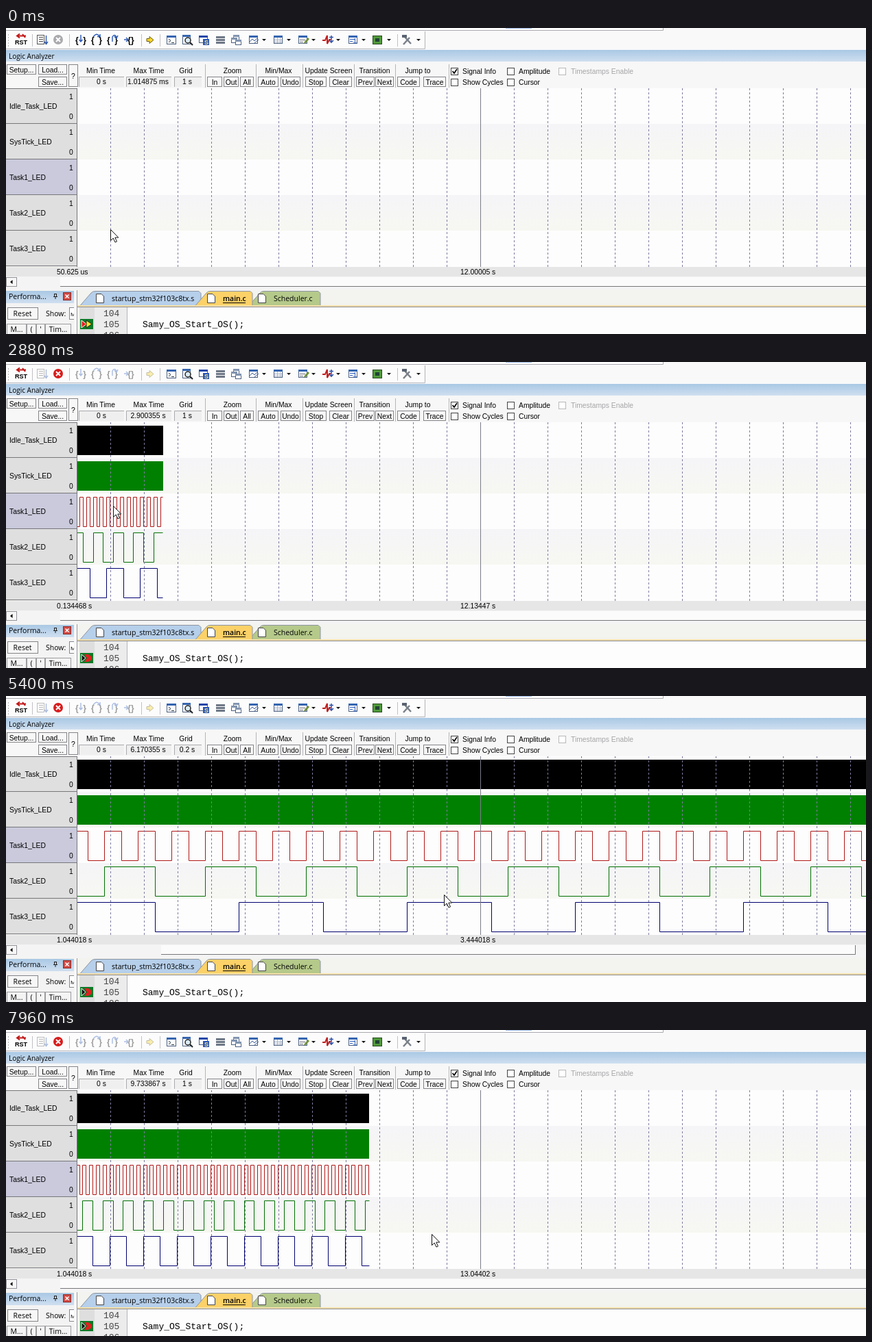
An HTML page for the animation above (8 s loop, 1253 by 447 pixels).

```html
<!DOCTYPE html>
<html lang="en">
<head>
<meta charset="utf-8">
<title>Logic Analyzer</title>
<style>
html, body { margin: 0; width: 100%; height: 100%; overflow: hidden; background: #f7f7f7; }
svg { display: block; width: 1253px; height: 447px; }
text { font: 10.35px "Liberation Sans", Arial, sans-serif; white-space: pre; }
.ui { font: 10.5px "Open Sans", "Noto Sans", sans-serif; }
.code { font: 13px "Liberation Mono", "Courier New", monospace; }
.bold { font-weight: 600; }
</style>
</head>
<body>
<svg id="stage" viewBox="0 0 1253 447">
  <defs>
    <linearGradient id="title" x2="0" y2="1"><stop stop-color="#a9c8e4"/><stop offset="1" stop-color="#cfdff0"/></linearGradient>
    <linearGradient id="band" x2="0" y2="1"><stop stop-color="#f5f5f8"/><stop offset="1" stop-color="#f7f7f2"/></linearGradient>
    <clipPath id="plot"><rect x="104" y="88" width="1149" height="261"/></clipPath>
  </defs>
</svg>
<script>
const NS = 'http://www.w3.org/2000/svg';
const stage = document.getElementById('stage');
let layer = stage;

function add(tag, attrs = {}, text) {
  const el = document.createElementNS(NS, tag);
  set(el, attrs);
  if (text !== undefined) el.textContent = text;
  layer.append(el);
  return el;
}
function set(el, attrs) {
  for (const k in attrs) el.setAttribute(k, attrs[k]);
}
function group(draw, attrs = {}) {
  const outer = layer, g = add('g', attrs);
  layer = g;
  draw();
  layer = outer;
  return g;
}
const rect = (x, y, width, height, fill, more) => add('rect', { x, y, width, height, fill, ...more });
const box = (x, y, w, h, fill, stroke) => rect(x + .5, y + .5, w - 1, h - 1, fill, { stroke });
const text = (s, x, y, more) => add('text', { x, y, ...more }, s);
const mid = (s, x, y, more) => text(s, x, y, { 'text-anchor': 'middle', ...more });
const line = (d, stroke, more) => add('path', { d, stroke, fill: 'none', ...more });
const shape = (d, fill, more) => add('path', { d, fill, ...more });
const show = (el, on) => el.setAttribute('visibility', on ? 'visible' : 'hidden');

// Toolbar
rect(0, 0, 1253, 32, '#f9f9fa');
rect(0, 0, 957, 3, '#fff');
line('M0 3.5H957.5V0', '#a9a9b0');
rect(728, 0, 38, 1, '#9cbbe8');
rect(0, 5, 610, 26, '#fcfcfc');
line('M0 30.5H610.5V5', '#b4b4ba');
for (const x of [38, 92, 197, 224, 570]) line(`M${x}.5 9V27`, '#c2c2c6');

line('M3.5 9V27', '#b4b4ba', { 'stroke-dasharray': '2 2' });
text('RST', 13, 24, { style: 'font-size:9px;font-weight:bold' });
line('M29 11.500H17M20 8.500L16 11.500L20 14.500M24 9L28 14', '#c01818', { 'stroke-width': 2 });

const hover = rect(41.5, 6.5, 22, 22, '#d8e8fb', { stroke: '#a8c8ee' });
const runTools = group(() => {
  box(45, 10, 11, 14, '#fff', '#555');
  line('M48 13.5H54M48 16.5H54M48 19.5H54', '#444');
  line('M58.5 11V23M56 20L58.5 23.5L61 20', '#2858b8', { 'stroke-width': 1.4 });
  // Braces with a step arrow in, over, out of and up to them
  [109, 132, 155, 180].forEach((x, i) => {
    mid(i < 3 ? '{  }' : '{}', x + (i === 3 ? 2 : 0), 22, { style: 'font-size:12px;font-weight:bold' });
    line(['M109 10V20M106.500 17L109 20L111.500 17',
      'M127 13Q132 6 136 12M133 12.500H137V9',
      'M155 20V13Q158 8 161 13M158 12L161 15L163 11',
      'M172 17H178M175 14L178 17L175 20'][i], '#2858b8', { 'stroke-width': 1.4 });
  });
  shape('M205 15.500H209V12.500L215 17.500L209 22.500V19.500H205Z', '#f6d62c', { stroke: '#6b5a10' });
});
const stopDisc = add('circle', { cx: 76, cy: 17, r: 7 });
line('M73 14L79 20M79 14L73 20', '#fff', { 'stroke-width': 2 });

function windowIcon(x, y, w, h, bar = '#3565b0') {
  box(x, y, w, h, '#fff', '#4b5f80');
  rect(x, y, w, 3, bar);
}
windowIcon(234, 11, 14, 13);
line('M237 16L240 18.500L237 21M241 21.500H245', '#234');
windowIcon(257, 10, 12, 14);
add('circle', { cx: 265, cy: 18, r: 4, fill: '#d8eaff', stroke: '#222', 'stroke-width': 1.5 });
line('M268 21L272 25', '#222', { 'stroke-width': 2 });
windowIcon(281, 11, 13, 11, '#1d46a8');
rect(287, 16, 9, 9, '#2b57b8');
text('S', 289, 24, { fill: '#ffe46a', style: 'font-size:9px;font-weight:bold' });
for (const y of [12, 16, 20]) rect(306, y, 13, 3, '#6d7786');
for (const [x, y] of [[331, 10], [328, 14], [334, 17]]) windowIcon(x, y, 9, 8, '#8294b0');
for (const x of [354, 390, 426, 499]) windowIcon(x, 11, 13, 12);
line('M355 20L359 16L362 19L366 15M362 22L368 17', '#37588f');
line('M391 17.500H402M391 20.500H402M395.500 14V22M399.500 14V22', '#aab4c6');
line('M428 17.500H436M428 20.500H433', '#667');
shape('M434 21L440 14L442 16L436 23Z', '#72913a');
line('M461 18H465L468 11V23L471 17H473', '#c02222', { 'stroke-width': 2 });
line('M471 13.500H477M474 11V21M471 18L474 21L477 18', '#3454a8', { 'stroke-width': 1.6 });
line('M501 16.500H509M501 19.500H505M508.500 15V23M506 20.500L508.500 23L511 20.500', '#2858b8');
box(534, 11, 14, 13, '#4f9a3a', '#244c1c');
rect(538, 15, 6, 5, '#243');
line('M579 24L588 14M580 12L590 23', '#7a8088', { 'stroke-width': 2.5 });
rect(577, 10, 7, 4, '#596270');
for (const x of [376, 412, 448, 484, 521, 558, 601]) shape(`M${x - 3} 16H${x + 3}L${x} 19Z`, '#111');

// Analyzer title and controls
rect(0, 32, 1253, 17, 'url(#title)');
text('Logic Analyzer', 4, 45, { class: 'ui', style: 'font-size:10px' });
rect(0, 49, 1253, 39, '#f7f7f7');
function button(s, x, y, w, h = 15) {
  box(x, y, w, h, '#f7f7f7', '#85858a');
  mid(s, x + w / 2, y + h / 2 + 4);
}
button('Setup...', 1, 53, 43);
button('Load...', 47, 53, 42);
button('Save...', 47, 71, 42);
button('?', 91, 53, 14, 33);
for (const x of [290, 364, 432, 507, 567, 645]) line(`M${x}.5 53V87`, '#b5b5b9');
[['Min Time', 138], ['Max Time', 208], ['Grid', 262], ['Zoom', 330], ['Min/Max', 397],
 ['Update Screen', 470], ['Transition', 537], ['Jump to', 600]].forEach(([s, x]) => mid(s, x, 66));
for (const [x, w] of [[106, 66], [175, 66], [245, 40]]) {
  rect(x, 71, w, 15, '#efefef');
  line(`M${x}.5 86V71.500H${x + w}`, '#aaaaae');
}
mid('0 s', 139, 82);
const maxText = mid('', 207, 82), gridText = mid('', 264, 82);
[['In', 293, 22], ['Out', 317, 22], ['All', 341, 20], ['Auto', 367, 30], ['Undo', 400, 29],
 ['Stop', 436, 31], ['Clear', 471, 33], ['Prev', 510, 27], ['Next', 538, 27],
 ['Code', 570, 33], ['Trace', 608, 33]].forEach(([s, x, w]) => button(s, x, 71, w));
[['Signal Info', 648, 58], ['Show Cycles', 648, 74], ['Amplitude', 730, 58],
 ['Cursor', 730, 74], ['Timestamps Enable', 805, 58]].forEach(([s, x, y]) => {
  const off = x === 805;
  box(x, y, 11, 11, '#fff', off ? '#b9b9b9' : '#444');
  text(s, x + (off ? 18 : 17), y + 9, { fill: off ? '#a5a5a8' : '#000' });
});
line('M650.500 63L653 66L657 60', '#000', { 'stroke-width': 1.7 });

// Signal rows
rect(104, 88, 1149, 261, '#fdfdfd');
['Idle_Task_LED', 'SysTick_LED', 'Task1_LED', 'Task2_LED', 'Task3_LED'].forEach((s, i) => {
  const y = 88 + 52 * i;
  if (i % 2) rect(104, y, 1149, 52, 'url(#band)');
  rect(0, y, 103, 52, i === 2 ? '#cacadc' : '#dfdfdf');
  line(`M0 ${y + 51.5}H103`, '#77777c');
  text(s, 5, y + 30);
  text('1', 92, y + 15.5);
  text('0', 92, y + 44.5);
});
line('M103.500 88V349M0 88.500H103', '#77777c');

const waves = group(() => {}, { 'clip-path': 'url(#plot)' });
layer = waves;
const idle = rect(104, 93, 0, 43, '#000');
const sysTick = rect(104, 145, 0, 43, '#008000');
const tasks = [
  { half: .1, top: 197.5, color: '#b01818' },
  { half: .3, top: 249.5, color: '#007000' },
  { half: .5, top: 301.5, color: '#000070' }
];
for (const k of tasks) k.path = line('', k.color);
layer = stage;
for (let x = 152.5; x < 1253; x += 49) {
  if (x !== 691.5) line(`M${x} 88V349`, '#7c7ca0', { 'stroke-dasharray': '3 3' });
}
line('M691.500 88V349', '#7c7c88');

// Time axis and scrollbar
rect(0, 349, 1253, 14, '#e6e6e6');
const leftText = text('', 74, 360), rightText = text('', 662, 360);
rect(0, 363, 1253, 16, '#f4f4f4');
box(0, 364, 16, 14, '#f7f7f7', '#929298');
shape('M9.500 368V374L6 371Z', '#000');
const thumb = rect(79, 364, 1180, 13, '#fbfbfb');
const thumbEdge = line('', '#77777c');

// Lower docks
rect(0, 379, 1253, 68, '#f3f3ef');
rect(0, 379, 1253, 4, '#f4f4f4');
rect(0, 384, 99, 18, 'url(#title)');
text('Performa...', 4, 396, { class: 'ui' });
line('M69 392.500H75M70.500 388V392M73.500 388V392M70 388.500H74M72 393V396', '#222');
box(83, 386, 12, 12, '#d24a44', '#8c2a28');
line('M86.500 389.500L91.500 394.500M91.500 389.500L86.500 394.500', '#fff', { 'stroke-width': 1.5 });
rect(0, 402, 99, 45, '#f3f3f3');
box(2, 408, 45, 18, '#f7f7f7', '#85858a');
mid('Reset', 24, 420.5, { class: 'ui' });
text('Show:', 58, 420.5, { class: 'ui' });
box(92, 408, 9, 18, '#fff', '#85858a');
text('M', 94, 420.5, { class: 'ui', style: 'font-size:8px' });
[[1, 29, 'M...'], [30, 14, '('], [44, 13, "'"], [57, 38, 'Tim...']].forEach(([x, w, s]) => {
  box(x, 432, w, 18, '#f4f4f4', '#9c9ca0');
  mid(s, x + w / 2, 444, { class: 'ui' });
});
rect(99, 383, 5, 64, '#f7f7f7');
line('M103.500 383V447', '#9a9aa0');

function tab(x, w, fill, s, tx, cls) {
  shape(`M${x} 405.500L${x + 16} 387Q${x + 18} 384.500 ${x + 22} 384.500H${x + w - 3}L${x + w} 387.500V405.500Z`, fill, { stroke: '#8c94a2' });
  const ix = tx - 23;
  shape(`M${ix + .5} 388.500H${ix + 8}L${ix + 11.5} 392V401.500H${ix + .5}Z`, '#fff', { stroke: '#444' });
  text(s, tx, 399, { class: cls });
}
tab(108, 176, '#b6cfea', 'startup_stm32f103c8tx.s', 154, 'ui');
tab(354, 104, '#b5c98a', 'Scheduler.c', 390, 'ui');
tab(276, 83, '#fbd168', 'main.c', 316, 'ui bold');
line('M316 401.500H349', '#000');
rect(104, 405, 1149, 2, '#f3dfa8');
line('M104 407.500H1253', '#8d8d92');
rect(107, 408, 1146, 39, '#fdfdfd');
rect(107, 408, 22, 39, '#dedede');
rect(129, 408, 48, 39, '#ececec');
line('M176.500 408V447', '#b4b4b8');
['104', '105', '106'].forEach((s, i) => text(s, 142, 421 + 16 * i, { class: 'code', fill: '#444' }));
text('Samy_OS_Start_OS();', 199, 437, { class: 'code' });
rect(108, 425, 19, 15, '#0c7a28');
const paused = group(() => {
  shape('M110 427L117 432.500L110 438Z', '#e02020', { stroke: '#fff' });
  shape('M117 427L125 432.500L117 438Z', '#ffe526', { stroke: '#222' });
});
const running = group(() => {
  shape('M110 427L116 432.500L110 438Z', '#111', { stroke: '#fff' });
  shape('M114 427H119Q124 428 125 432.500Q124 437 119 438H114L118 432.500Z', '#e02020');
});

// Tooltip
let tipCells;
const tip = group(() => {
  box(0, 0, 344, 71, '#fefefe', '#77777c');
  const cell = (s, x, y) => text(s, x, y, { class: 'ui', fill: '#55555a' });
  const title = cell('', 5, 14);
  cell('Mouse Pos', 108, 27);
  cell('Reference Point', 210, 27);
  cell('Delta', 312, 27);
  const values = ['Time:', 'Value:', 'PC $:'].map((s, i) => {
    const y = 40 + 12.5 * i;
    cell(s, 5, y);
    cell('N/A', 210, y);
    if (i < 2) cell('N/A', 312, y);
    return cell('', 108, y);
  });
  tipCells = [title, ...values];
});
const tips = [
  { from: 3520, to: 4240, x: 155, y: 230, cells: ['Task1_LED', '1.256018 s', '1', '0x8000c44'] },
  { from: 6080, to: 6640, x: 769, y: 268, cells: ['Task2_LED', '3.760018 s', '1', '0x8000c68'] }
];

const pointer = shape('M0 0V16L3.700 12.500L6.500 18.500L9 17.400L6.300 11.600H11.300Z', '#fff', { stroke: '#111' });

// Motion
const START = 1240, SCROLL = 4930, REFRESH = 130;
const simKeys = [[START, .001014875], [2880, 2.900355], [4000, 4.881355],
  [5400, 6.170355], [6400, 6.903341], [7960, 9.733867]];
const pointerKeys = [[0, 152, 294], [240, 152, 294], [920, 45, 22], [1320, 45, 22],
  [2200, 156, 210], [3280, 156, 210], [3480, 155, 211], [3720, 155, 211], [4000, 201, 205],
  [4320, 201, 205], [5400, 638, 290], [5880, 769, 249], [6520, 769, 249], [7400, 620, 298]];
const views = [[0, .000050625, 1], [START + 40, .134468, 1], [3120, .702942, .5],
  [3200, 1.044018, .2], [6200, 1.044018, .5], [6280, 1.044018, 1]];

function track(keys, t, ease = u => u) {
  const i = keys.findIndex(k => k[0] > t);
  if (i < 0) return keys[keys.length - 1].slice(1);
  if (i === 0) return keys[0].slice(1);
  const a = keys[i - 1], b = keys[i];
  const u = ease((t - a[0]) / (b[0] - a[0]));
  return a.slice(1).map((v, n) => v + (b[n + 1] - v) * u);
}
const smooth = u => u * u * (3 - 2 * u);

function seconds(v) {
  if (v < .001) return (v * 1e6).toFixed(3) + ' us';
  if (v < .1) return (v * 1e3).toFixed(6) + ' ms';
  return v.toFixed(v < 10 ? 6 : 5) + ' s';
}

function squareWave({ half, top }, left, grid, end) {
  const phase = .0065;
  const toX = s => Math.floor(104 + (s - left) / grid * 49) + .5;
  let n = Math.floor((left - phase) / half);
  const level = () => top + (Math.abs(n) % 2 ? 43 : 0);
  let d = `M103.5 ${level()}`;
  for (n++; n * half + phase < end; n++) d += `H${toX(n * half + phase)}V${level()}`;
  return d + `H${toX(end)}`;
}

function render(t) {
  const on = t >= START;
  const [, left, grid] = views.filter(v => v[0] <= t).pop();
  const [now] = track(simKeys, t);
  const drawn = Math.floor((t - 2755) / REFRESH) * REFRESH + 2755;
  const [end] = track(simKeys, drawn);

  maxText.textContent = on ? seconds(now) : '1.014875 ms';
  gridText.textContent = grid + ' s';
  leftText.textContent = seconds(left);
  rightText.textContent = seconds(left + 12 * grid);

  const live = on && end > left;
  show(waves, live);
  if (live) {
    const width = Math.round((end - left) / grid * 49);
    set(idle, { width });
    set(sysTick, { width });
    for (const k of tasks) set(k.path, { d: squareWave(k, left, grid, end) });
  }

  const scrolled = t >= SCROLL && grid < .5;
  const tx = scrolled ? 226 : 79, tw = scrolled ? 1012 : 1180;
  set(thumb, { x: tx, width: tw });
  set(thumbEdge, { d: `M${tx} 377.5H${tx + tw - .5}V364` });

  const [px, py] = track(pointerKeys, t, smooth);
  set(pointer, { transform: `translate(${Math.round(px) + .5} ${Math.round(py) + .5})` });
  show(hover, !on && px < 63 && py < 29);
  set(runTools, { opacity: on ? .38 : 1 });
  set(stopDisc, { fill: on ? '#d81c1c' : '#aaaaae' });
  show(paused, !on);
  show(running, on);

  const note = tips.find(n => t >= n.from && t < n.to);
  show(tip, !!note);
  if (note) {
    set(tip, { transform: `translate(${note.x} ${note.y})` });
    tipCells.forEach((c, i) => { c.textContent = note.cells[i]; });
  }
}

function frame() {
  render(Math.floor(performance.now() % 8000 / 40) * 40);
  requestAnimationFrame(frame);
}
frame();
</script>
</body>
</html>
```
